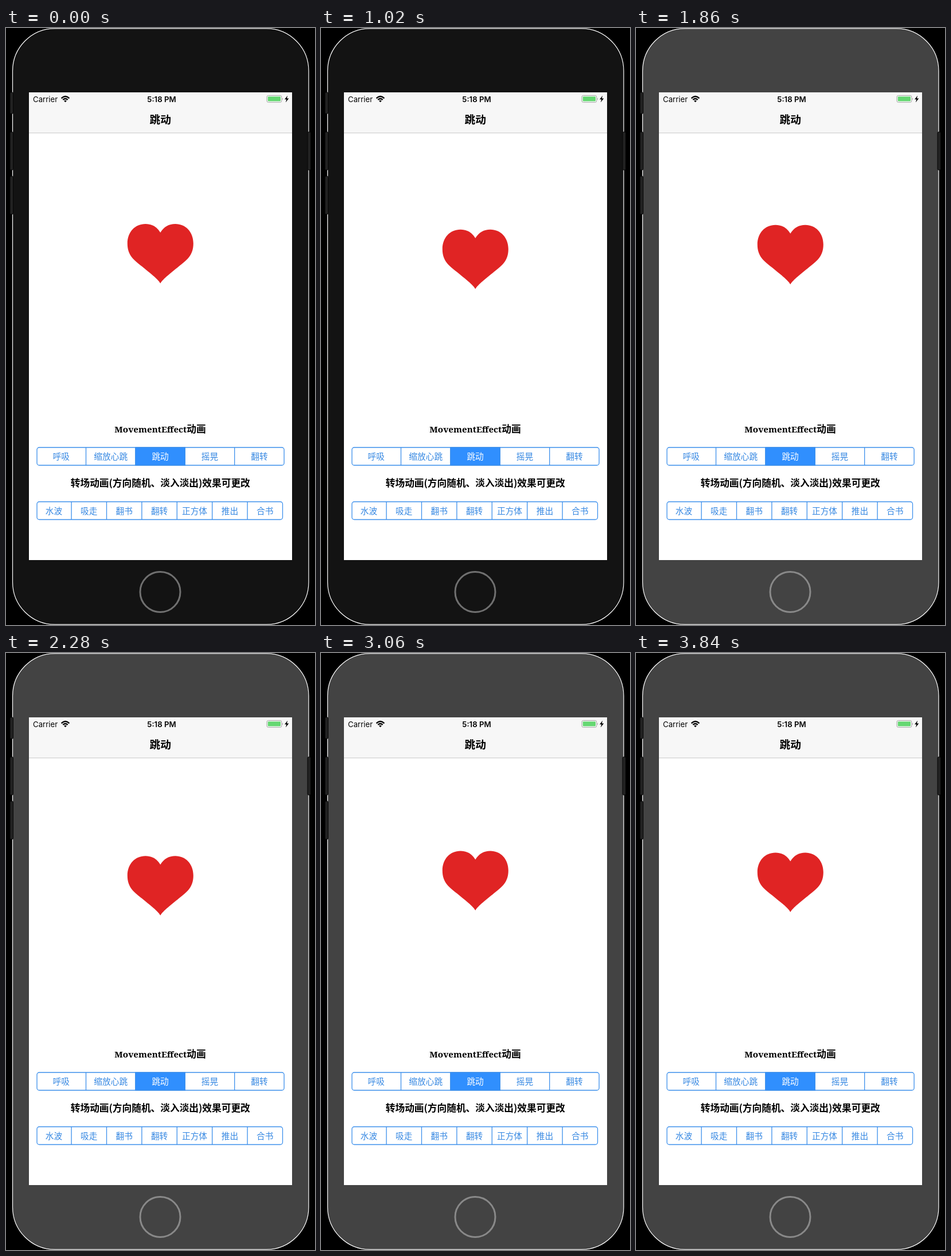
These frames come from a looping animation (539x1039 px, 3.9 s). An HTML page:

```html
<!DOCTYPE html>
<html lang="zh">
<head>
<meta charset="utf-8">
<style>
  html, body { margin: 0; width: 100%; height: 100%; overflow: hidden; background: #000; }
  svg { display: block; --body: #131313; --ring: #707070; }
  svg.dimmed { --body: #434343; --ring: #898989; }
  text { font: 14.7px "Noto Sans CJK SC", "Noto Sans CJK", sans-serif; text-anchor: middle; }
  .status { font: 13.2px Inter, sans-serif; }
  .title { font-size: 18.7px; font-weight: 700; }
  .label { font-size: 16.7px; font-weight: 700; }
  .slab { font: 700 15.2px "Noto Serif", serif; }
  .segments { fill: none; stroke: #3d90ec; stroke-width: 1.3; }
  .segments text { fill: #3688e2; stroke: none; }
  .segments .on { fill: #fff; }
</style>
</head>
<body>
<svg id="stage" width="539" height="1039" viewBox="0 0 539 1039">
  <rect x="11.5" y=".8" width="516.5" height="1037.4" rx="74" fill="var(--body)" stroke="#fff" stroke-width="1.2"/>
  <g fill="#222" stroke="#050505">
    <rect x="7" y="112" width="5.5" height="37" rx="1.5"/>
    <rect x="7" y="181" width="5.5" height="66" rx="1.5"/>
    <rect x="7" y="258" width="5.5" height="66" rx="1.5"/>
    <rect x="526" y="181" width="5.5" height="66" rx="1.5"/>
  </g>
  <circle cx="269" cy="981.5" r="35" fill="none" stroke="var(--ring)" stroke-width="3"/>

  <path d="M40 112H499V926H40Z" fill="#fff"/>
  <path d="M40 112H499V183H40Z" fill="#f7f7f7"/>
  <path d="M40 182.7H499" stroke="#c9c9c9"/>

  <text class="status" x="47" y="128.5" style="text-anchor:start">Carrier</text>
  <g fill="none" stroke="#000" stroke-width="2.3">
    <path d="M96.6 122.3Q103.5 115.7 110.4 122.3M99.3 125Q103.5 121 107.7 125"/>
    <path d="M103.5 129.3L101.1 126.8Q103.5 124.9 105.9 126.8Z" fill="#000" stroke="none"/>
  </g>
  <text class="status" x="271.5" y="128.5" style="font-weight:600">5:18 PM</text>
  <rect x="455" y="117.5" width="25.7" height="11.8" rx="2.5" fill="#fff" stroke="#a0a0a0"/>
  <rect x="456.7" y="119.2" width="22.3" height="8.4" rx="1" fill="#65d772"/>
  <path d="M482 121.5Q484 123.5 482 125.5Z" fill="#999"/>
  <path d="M491.2 117.5L486 124.3H489.2L487.8 129.5L493.3 122.4H489.9Z"/>
  <text class="title" x="269.3" y="166">跳动</text>

  <path id="heart" fill="#e02424" d="M0 15C-6 5 -15 0 -26 0C-44 0 -57.5 14 -57.5 34C-57.5 55 -46 63 -32 74C-20 84 -4 96 0 103.5C4 96 20 84 32 74C46 63 57.5 55 57.5 34C57.5 14 44 0 26 0C15 0 6 5 0 15Z"/>

  <text class="label" x="269" y="703.8"><tspan class="slab">MovementEffect</tspan>动画</text>
  <g class="segments" id="layers"></g>
  <text class="label" x="269.3" y="798">转场动画(方向随机、淡入淡出)效果可更改</text>
  <g class="segments" id="transitions"></g>
</svg>
<script>
const stage = document.getElementById('stage');
const heart = document.getElementById('heart');

function segments(id, labels, left, step, top, height, selected = -1) {
  const right = left + step * labels.length;
  let dividers = '';
  let texts = '';
  labels.forEach((label, i) => {
    const x = left + step * i;
    if (i) dividers += `M${x} ${top}v${height}`;
    if (i === selected) texts += `<path d="M${x} ${top}h${step}v${height}h${-step}z" fill="#308ffe"/>`;
    texts += `<text class="${i === selected ? 'on' : ''}" x="${x + step / 2}" y="${top + height / 2 + 5.5}">${label}</text>`;
  });
  document.getElementById(id).innerHTML =
    `<rect x="54" y="${top}" width="${right - 54}" height="${height}" rx="4"/><path d="${dividers}"/>${texts}`;
}

segments('layers', ['呼吸', '缩放心跳', '跳动', '摇晃', '翻转'], 53.1, 86.4, 730, 31, 2);
segments('transitions', ['水波', '吸走', '翻书', '翻转', '正方体', '推出', '合书'], 52.7, 61.4, 824.5, 31);

const LOOP = 3900, TICK = 60, DIM_AT = 1740;
const PERIOD = 1794, PEAK_AT = 1600, TOP = 336.1, TRAVEL = 22.7;

function draw(now) {
  const t = Math.floor((now % LOOP) / TICK) * TICK;
  // Linear bounce: 0 at the peak, 1 at the lowest point
  const cycles = (t - PEAK_AT) / PERIOD;
  const drop = 2 * Math.abs(cycles - Math.round(cycles));
  heart.setAttribute('transform', `translate(269.3 ${TOP + TRAVEL * drop})`);
  stage.classList.toggle('dimmed', t >= DIM_AT);
}

const start = performance.now();
function frame() {
  draw(performance.now() - start);
  requestAnimationFrame(frame);
}
frame();
</script>
</body>
</html>
```
